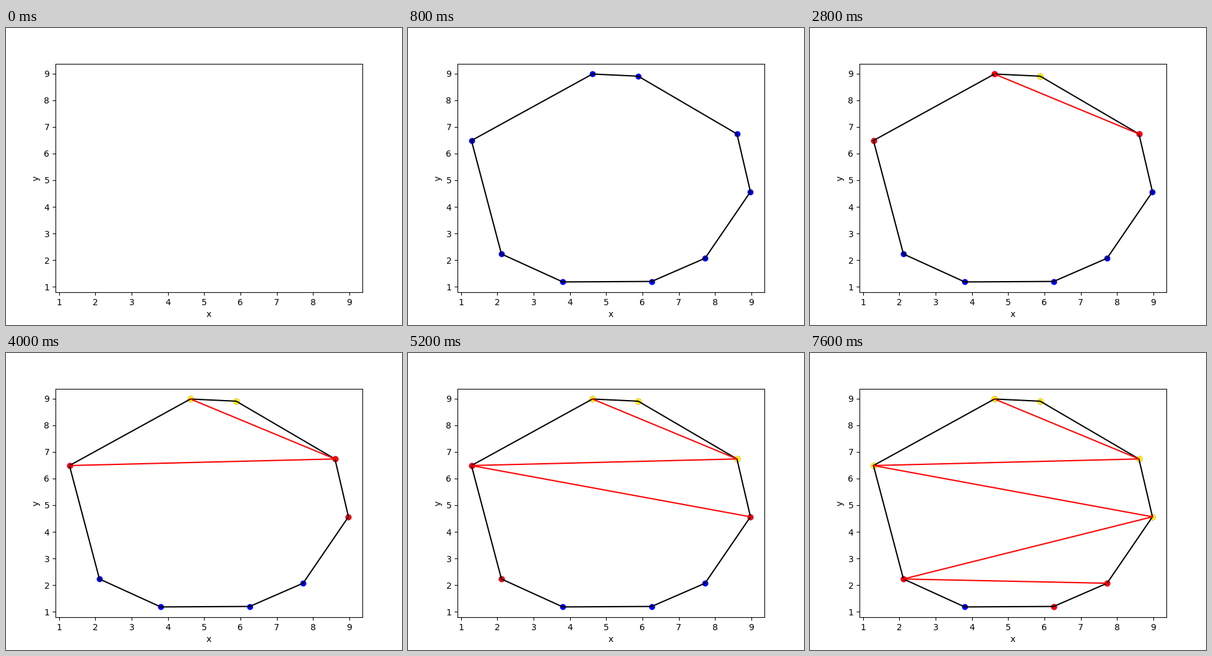
Animation of 640x480 px, one loop 8 s. Source, as a matplotlib script:

```python
import matplotlib.pyplot as plt
import numpy as np
from matplotlib.animation import FuncAnimation

FRAMES = 20
INTERVAL = 400
CENTER = 5
RADIUS = 4
# Directions of the polygon's vertices on a circle, clockwise from the leftmost
ANGLES = np.radians([158.18, 95.43, 77.25, 25.7, -6.25, -47.06, -71.73, -107.41, -136.2])

fig, ax = plt.subplots(figsize=(6.4, 4.8), dpi=100)
ax.set_xlabel("x")
ax.set_ylabel("y")

timeline = []  # pairs of (first visible frame, artist)


def add_points(start, points, color):
    timeline.append((start, ax.scatter(*zip(*points), color=color)))


def add_line(start, points, color):
    timeline.append((start, ax.plot(*zip(*points), color=color)[0]))


def on_right(point):
    return point[0] > CENTER


polygon = [(CENTER + RADIUS * np.cos(a), CENTER + RADIUS * np.sin(a)) for a in ANGLES]
add_points(1, polygon, "blue")
add_line(2, polygon + polygon[:1], "black")

# Sweep downwards with one active vertex on each side of the polygon
first, second, *rest = sorted(polygon, key=lambda point: -point[1])
active = {on_right(first): first, on_right(second): second}
for point in active.values():
    add_points(3, [point], "red")

# A reached vertex is joined to the other side and replaces the one on its own
for step, reached in enumerate(rest):
    start = 4 + 3 * step
    side = on_right(reached)
    add_points(start, [reached], "red")
    add_line(start + 1, [active[not side], reached], "red")
    add_points(start + 2, [active[side]], "yellow")
    active[side] = reached

# Settle the limits while every artist is present
ax.autoscale_view()
ax.autoscale(False)


def update(frame):
    for start, artist in timeline:
        artist.set_visible(frame >= start)
    return [artist for _, artist in timeline]


anim = FuncAnimation(fig, update, frames=FRAMES, interval=INTERVAL,
                     init_func=lambda: update(0), repeat=True, repeat_delay=0)
plt.show()
```
